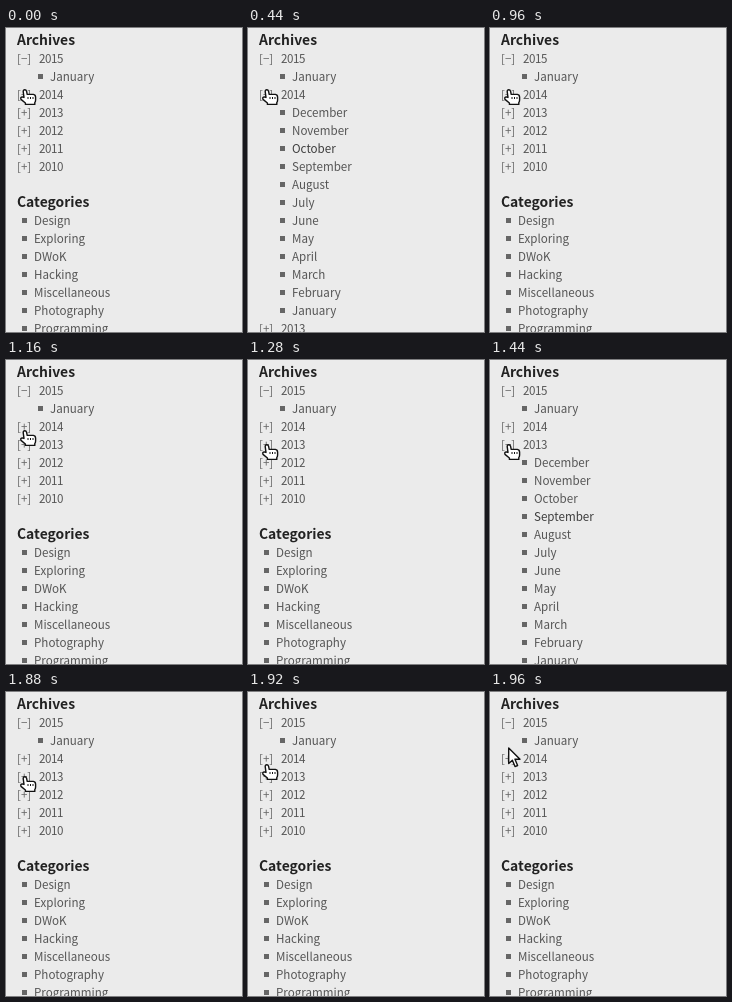
Recreate the animation shown at these times as an HTML page. Size 236 px wide and 304 px high, loop 2000 ms.

```html
<!DOCTYPE html>
<html lang="en">
<head>
<meta charset="utf-8">
<title>Archives</title>
<style>
  html, body { margin: 0; width: 100%; height: 100%; overflow: hidden; background: #ebebeb; }
  body {
    position: relative;
    font: 11.6px/18px "Noto Sans CJK SC", "Noto Sans CJK JP", "Noto Sans", sans-serif;
    color: #555;
  }
  nav { position: absolute; left: 11px; top: 3px; white-space: nowrap; }
  h2 { margin: 0; height: 18px; font-size: 13.9px; line-height: 16px; font-weight: 700; color: #222; }
  ul { margin: 0; padding: 0; list-style: none; }
  li { position: relative; height: 18px; padding-left: 17px; }
  li::before { content: ""; position: absolute; left: 5px; top: 7px; width: 5px; height: 5px; background: #666; }
  .months { overflow: hidden; }
  .months li { padding-left: 33px; }
  .months li::before { left: 21px; }
  .year { display: flex; height: 18px; letter-spacing: -.4px; }
  .mark { width: 22px; overflow: hidden; color: #666; letter-spacing: 0; }
  .mark span { display: block; }
  .visited { color: #3c3c3c; }
  #categories { margin-top: 18px; }

  .months.y2014, .months.y2013 { max-height: 0; animation: open14 2s step-end infinite; }
  .months.y2013 { animation-name: open13; }
  .y2014 .mark span { animation: flip14 2s step-end infinite; }
  .y2013 .mark span { animation: flip13 2s step-end infinite; }
  @keyframes open14 { 0%, 48% { max-height: 0 } 22% { max-height: 216px } }
  @keyframes open13 { 0%, 94% { max-height: 0 } 72% { max-height: 216px } }
  @keyframes flip14 { 0%, 48% { transform: none } 22% { transform: translateY(-18px) } }
  @keyframes flip13 { 0%, 94% { transform: none } 72% { transform: translateY(-18px) } }

  .cursor {
    position: absolute; left: 0; top: 0; width: 18px; height: 22px; overflow: visible;
    animation: move 2s step-end infinite;
  }
  .cursor path { fill: #fff; stroke: #111; stroke-width: 1.4; stroke-linejoin: round; }
  .cursor .line { fill: none; stroke-width: 1; }
  .hand { animation: hand 2s step-end infinite; }
  .arrow { animation: arrow 2s step-end infinite; }
  @keyframes move {
    0% { transform: translate(14px, 61px) }
    56% { transform: translate(14px, 64px) }
    58% { transform: translate(14px, 70px) }
    60% { transform: translate(14px, 76px) }
    62% { transform: translate(14px, 81px) }
    64% { transform: translate(14px, 84px) }
    96% { transform: translate(14px, 72px) }
    98%, 100% { transform: translate(18px, 55px) }
  }
  @keyframes hand { 0% { opacity: 1 } 98%, 100% { opacity: 0 } }
  @keyframes arrow { 0% { opacity: 0 } 98%, 100% { opacity: 1 } }
</style>
</head>
<body>
<nav>
  <h2>Archives</h2>
  <div id="archives"></div>
  <h2 id="categories">Categories</h2>
  <ul id="topics"></ul>
</nav>
<svg class="cursor" viewBox="0 0 18 22">
  <g class="hand">
    <path d="M4 8.4L3.2 2.6Q3.2 .8 4.8 .8Q6.2 .8 6.6 2.4L7.2 5.4H13.4Q15.6 5.8 15.6 8.2V11Q15.6 12.6 14.8 13.4V15.4H5.4V14L1 10.4Q.2 9 1.4 8.2Q2.6 7.6 4 8.4Z"/>
    <path class="line" d="M8 8V10M10.5 8V10M13 8V10"/>
  </g>
  <g class="arrow">
    <path d="M.7 1V16.6L4.4 13.2L7 19.6L9.6 18.5L7 12.2H12Z"/>
  </g>
</svg>
<script>
  const months = ["December", "November", "October", "September", "August", "July",
    "June", "May", "April", "March", "February", "January"];
  const topics = ["Design", "Exploring", "DWoK", "Hacking", "Miscellaneous", "Photography", "Programming"];
  const visited = { 2014: "October", 2013: "September" };

  const items = (names, seen) =>
    names.map(n => `<li${n === seen ? ' class="visited"' : ""}>${n}</li>`).join("");

  const year = (y, marks, names = []) => `
    <div class="year y${y}">
      <div class="mark">${marks.map(m => `<span>[${m}]</span>`).join("")}</div>
      <div>${y}</div>
    </div>
    <ul class="months y${y}">${items(names, visited[y])}</ul>`;

  document.getElementById("archives").innerHTML =
    year(2015, ["−"], ["January"]) +
    [2014, 2013].map(y => year(y, ["+", "−"], months)).join("") +
    [2012, 2011, 2010].map(y => year(y, ["+"])).join("");
  document.getElementById("topics").innerHTML = items(topics);
</script>
</body>
</html>
```
